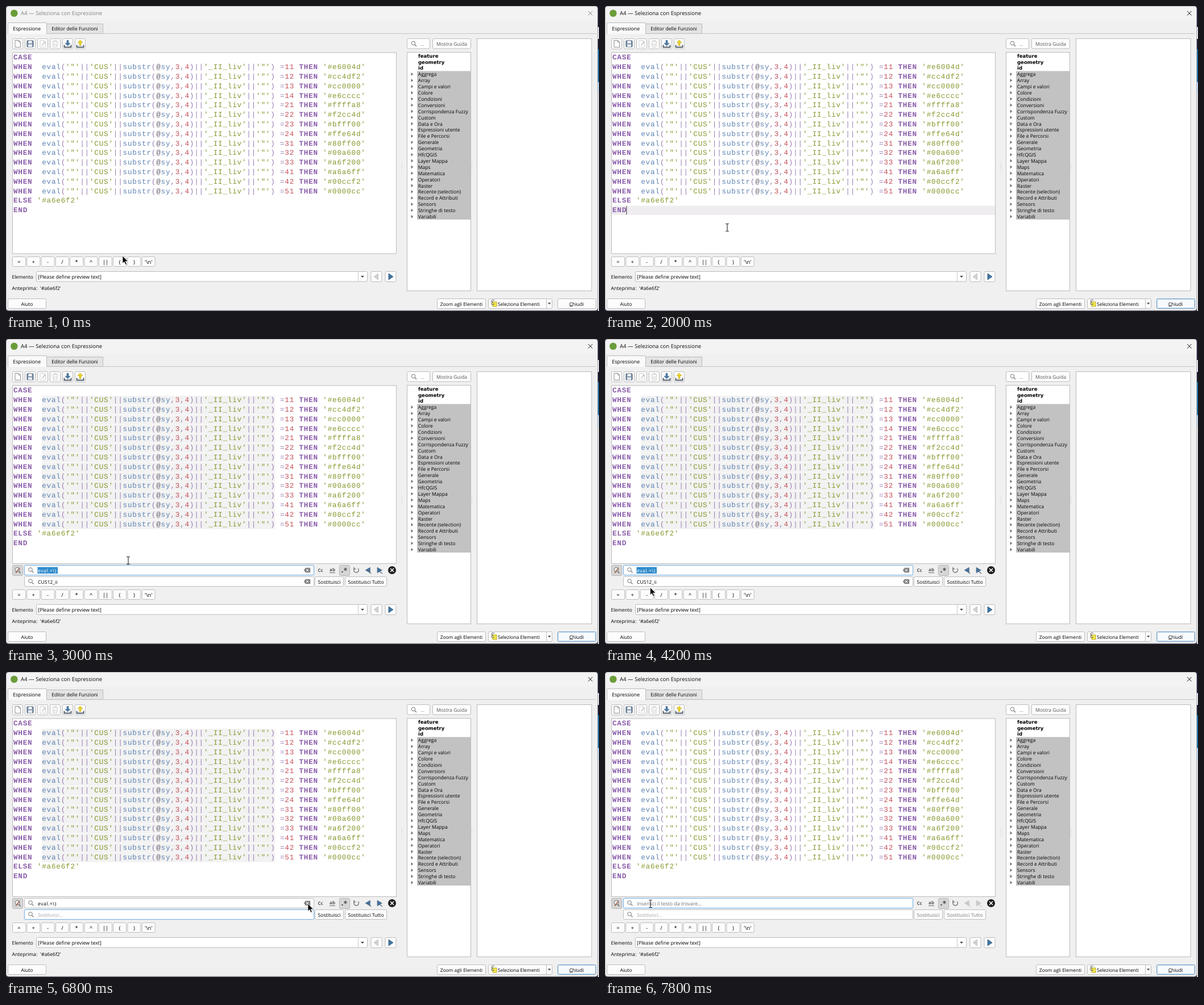
An HTML page for the animation above (8000 ms loop, 1043 by 537 pixels).

```html
<!DOCTYPE html>
<html lang="it">
<head>
<meta charset="utf-8">
<title>Seleziona con Espressione</title>
<style>
html, body { margin: 0; width: 100%; height: 100%; overflow: hidden; background: #f0f0f0; }
svg { display: block; width: 1043px; height: 537px; text-rendering: geometricPrecision; }
text { font: 8.6px "Open Sans", sans-serif; fill: #000; white-space: pre; }
.title { font-size: 9.6px; }
.bold { font: bold 8.55px "DejaVu Sans", sans-serif; }
.code { font: 12.7px "Liberation Mono", monospace; letter-spacing: .76px; }
.kw { fill: #8a5ca9; font-weight: bold; }
.fn { fill: #5f84b4; }
.str { fill: #86992f; }
.num { fill: #c4505a; }
.op { fill: #9a7cb4; }
.at { fill: #6a6470; }
.layer { visibility: hidden; }
</style>
</head>
<body>
<svg id="stage" viewBox="0 0 1043 537" xmlns="http://www.w3.org/2000/svg"></svg>
<script>
const LOOP = 8000;
const LINE = 16.8, COL = 8.38, LEFT = 12.5, BASE = 94.3;

// [start, visible layers]
const STATES = [
  [0, 'idle'],
  [1000, 'active line caret'],
  [1800, 'active line'],
  [2000, 'active line caret'],
  [2200, 'active find marks focus1 picked tail with usable'],
  [3000, 'active find marks focus1 picked with usable'],
  [3200, 'active find marks focus1 picked tail with usable'],
  [3600, 'active find marks focus1 picked with usable'],
  [4800, 'active find marks focus1 picked tail with usable'],
  [5400, 'active find marks focus1 picked with usable'],
  [5800, 'active find marks focus1 picked tail with usable'],
  [6400, 'active find marks query focus2 hint2 usable'],
  [7000, 'active find focus1 hint1 hint2 unusable']
];

// [start, x, y, pointer]
const MOVES = [
  [0, 205, 440, 'arrow'], [200, 207, 425, 'beam'], [400, 211, 408, 'beam'],
  [600, 215, 396, 'beam'], [800, 215, 390, 'beam'],
  [3600, 190, 404, 'beam'], [3800, 150, 424, 'beam'], [4000, 105, 438, 'arrow'],
  [4200, 79.5, 437.5, 'arrow'],
  [4800, 83, 426, 'beam'], [5000, 112, 412, 'beam'], [5200, 200, 410, 'beam'],
  [5400, 330, 416, 'beam'], [5600, 455, 423, 'beam'], [5800, 522, 427, 'beam'],
  [6000, 529, 427, 'arrow'], [6200, 531, 427, 'arrow'],
  [6600, 531, 418, 'arrow'], [6800, 531, 408, 'arrow'],
  [7200, 470, 411, 'beam'], [7400, 300, 409, 'beam'], [7600, 130, 408, 'beam'],
  [7800, 80, 408, 'beam']
];

const rect = (x, y, w, h, fill, stroke = 'none', r = 0) =>
  `<rect x="${x}" y="${y}" width="${w}" height="${h}" fill="${fill}" stroke="${stroke}" rx="${r}"/>`;
const path = (d, stroke, width = 1, fill = 'none') =>
  `<path d="${d}" stroke="${stroke}" stroke-width="${width}" fill="${fill}"/>`;
const text = (x, cy, s, attrs = '') => `<text x="${x}" y="${cy + 3.1}" ${attrs}>${s}</text>`;
const layer = (name, body) => `<g class="layer" data-name="${name}">${body}</g>`;
const at = (x, y, body) => `<g transform="translate(${x} ${y})">${body}</g>`;
const button = (x, y, w, h, label = '', attrs = '', cx = x + w / 2) =>
  rect(x, y, w, h, '#fcfcfc', '#bdbdbd', 2) +
  (label && text(cx, y + h / 2 + .4, label, `text-anchor="middle" ${attrs}`));
const lens = (x, y) =>
  `<circle cx="${x - 1}" cy="${y - 1}" r="3.3" fill="none" stroke="#777"/>` +
  path(`M${x + 1.5} ${y + 1.5}l3 3`, '#777', 1.3);

function desktop() {
  return rect(0, 0, 1043, 537, '#20223a') +
    rect(1041, 37, 2, 21, '#d8dce6') + rect(1041, 76, 2, 58, '#2372a8') +
    rect(1041, 134, 2, 20, '#b9d0ea') + rect(1041, 154, 2, 383, '#d5d6da') +
    rect(.5, .5, 1040, 535.5, '#f0f0f0', '#b9b9bd', 4) +
    rect(1, 1, 1039, 25, '#f3f3f4', 'none', 4);
}

function titleBar() {
  const head = color =>
    text(26, 13, 'A4 — Seleziona con Espressione', `class="title" style="fill:${color}"`) +
    path('M1024 9l7.5 7.5M1031.5 9l-7.5 7.5', color);
  const close = text(1003.5, 524.4, 'Chiudi', 'text-anchor="middle"') + path('M991 528.5h6', '#111', .7);
  return '<circle cx="14.3" cy="12.7" r="6.3" fill="#6a9d38"/>' +
    button(970.5, 515.5, 67, 17) +
    layer('idle', head('#858585')) +
    layer('active', head('#111') + rect(970.5, 515.5, 67, 17, '#f7fafd', '#6f9dc6', 2) +
      rect(971.5, 516.5, 65, 15, 'none', '#c3dbf0', 1)) + close;
}

function tabs() {
  return path('M3 48.5H1037.5', '#c6c6c6') +
    rect(71.5, 31.5, 99, 17, '#e4e4e4', '#bcbcbc') +
    path('M3.5 49V31Q3.5 29.5 5 29.5H70Q71.5 29.5 71.5 31V49', '#bcbcbc', 1, '#fafafa') +
    text(12.3, 39.6, 'Espressione', 'style="font-size:8.75px"') +
    text(80.3, 40.2, 'Editor delle Funzioni');
}

function toolbar() {
  const page = c => path('M-4.5 -6H2L5 -3V6H-4.5ZM2 -6V-3H5', c, 1, '#fff');
  const tray = c => path('M-6 2V6H6V2', '#4c5966', 1.8) + c;
  const icons = [
    page('#8d8d8d'),
    rect(-5.5, -5.5, 11, 11, '#8196ae', '#42566d', 1) + rect(-3, -5, 6, 4, '#fff') + rect(-3.5, 1, 7, 4.5, '#e5ebf1'),
    page('#d2d2d2') + path('M-1 3L5 -4', '#c4c4c4', 1.6),
    path('M-5 -4H5M-2 -4V-6H2V-4M-4 -3L-3.4 6H3.4L4 -3M-1.5 -1V4M1.5 -1V4', '#cdcdcd'),
    tray(path('M-1.5 -6H1.5V-1H4.5L0 3.5L-4.5 -1H-1.5Z', '#385f84', .6, '#4b7ba8')),
    tray(path('M-1.5 3H1.5V-2H4.5L0 -6.5L-4.5 -2H-1.5Z', '#b59b11', .6, '#ecd526'))
  ];
  return icons.map((icon, i) =>
    button(11.5 + 22 * i, 57.5, 18, 18) + at(20.5 + 22 * i, 66.5, icon)).join('');
}

function paint(line) {
  const parts = /('[^']*')|(WHEN|THEN|CASE|ELSE|END)|([a-z]+)|(\d+)|(@)|([^'\w@]+)/g;
  const kinds = ['str', 'kw', 'fn', 'num', 'at', 'op'];
  return line.replace(parts, (all, ...groups) =>
    `<tspan class="${kinds[groups.slice(0, kinds.length).findIndex(Boolean)]}">${all}</tspan>`);
}

function editor() {
  const rules = `11 e6004d,12 cc4df2,13 cc0000,14 e6cccc,21 ffffa8,22 f2cc4d,23 bfff00,
24 ffe64d,31 80ff00,32 00a600,33 a6f200,41 a6a6ff,42 00ccf2,51 0000cc`.split(/,\s*/);
  const lines = ['CASE', ...rules.map(rule => {
    const [code, color] = rule.split(' ');
    return `WHEN  eval('"'||'CUS'||substr(@sy,3,4)||'_II_liv'||'"') =${code} THEN '#${color}'`;
  }), "ELSE '#a6e6f2'", 'END'];
  const top = i => BASE - 11.4 + LINE * i;
  const marks = rules.map((_, i) =>
    rect(LEFT + 6 * COL, top(i + 1) + .4, 49 * COL, LINE - .6, '#f2f2f2', 'none', 1)).join('');
  return rect(11.5, 82, 675, 354, '#fff', '#bbb') +
    layer('line', rect(12, top(16), 674, LINE - .6, '#efedf0')) +
    layer('marks', marks) +
    lines.map((s, i) => `<text class="code" x="${LEFT + .4}" y="${BASE + LINE * i}">${paint(s)}</text>`).join('') +
    layer('caret', path(`M37.8 ${top(16) + .5}v${LINE - 1.6}`, '#333'));
}

function field(y, focus) {
  return rect(32.5, y, 509, 17, '#fff', '#bdbdbd', 2) +
    layer(focus, rect(32.5, y, 509, 17, '#fff', '#6fa9dd', 2) + rect(31.7, y - .8, 510.6, 18.6, 'none', '#cfe3f5', 2)) +
    lens(44, y + 8.5);
}

function findBar() {
  const erase = y => path(`M524 ${y}l3 -4h8v8h-8z`, '#858585', .5, '#858585') +
    path(`M528 ${y - 2}l4 4m0 -4l-4 4`, '#fff', 1);
  const query = attrs => text(56, 407.4, 'eval.+\\)', `style="letter-spacing:.5px;${attrs}"`);
  const replaceButtons = attrs =>
    button(543.5, 418.5, 50, 17, 'Sostituisci', attrs) + button(596.5, 418.5, 73, 17, 'Sostituisci Tutto', attrs);
  const steps = (fill, edge) =>
    path('M640.5 402V412L632 407Z', edge, .5, fill) + path('M653 402V412L661.5 407Z', edge, .5, fill) +
    path('M638 409l4 4M657 409l5 4', edge, 1.2);
  const tools =
    rect(11.5, 398.5, 18, 18, '#d6d6d6', '#b5b5b5', 2) +
    '<circle cx="20" cy="406" r="4" fill="#eee" stroke="#777"/>' + path('M17 412L24 403', '#a4604c', 1.6) +
    path('M22.5 409l3 3.5', '#666', 1.4) +
    text(553, 406.5, 'Cc', 'text-anchor="middle" style="font-weight:bold;font-size:8px;fill:#555"') +
    text(574, 406.3, 'ab', 'text-anchor="middle" style="font-weight:bold;font-size:8px;fill:#555"') +
    path('M569 411.5h10', '#666') +
    rect(586.5, 398.5, 18, 18, '#d6d6d6', '#b5b5b5', 2) +
    rect(590.5, 409, 2, 2, '#333') + path('M597 402.5v6M594.4 404l5.2 3M599.6 404l-5.2 3', '#333') +
    path('M613.3 403.5A4.3 4.3 0 1 0 619.2 403.8', '#666', 1.2) + path('M612 401.5v3.5h3.5', '#666', 1.1) +
    '<circle cx="679" cy="407" r="7" fill="#1d1d1d"/>' + path('M676 404l6 6m0 -6l-6 6', '#fff', 1.6);
  return layer('find', rect(10, 396, 679, 42, '#f0f0f0') + path('M11 395.5H687', '#bbb') + tools +
      field(398.5, 'focus1') + field(418.5, 'focus2')) +
    layer('picked', rect(55.5, 401.5, 35.5, 11.5, '#318ccb') + query('fill:#fff') + erase(407)) +
    layer('tail', path('M91.2 401.5v11.5', '#111')) +
    layer('query', query('') + erase(407)) +
    layer('with', text(56, 427.7, 'CUS12_ii') + erase(427)) +
    layer('hint1', text(56, 407.6, 'Inserisci il testo da trovare...', 'style="fill:#707070;font-size:8.8px"')) +
    layer('hint2', text(56, 427.6, 'Sostituisci...', 'style="fill:#a5a5a5;font-style:italic"')) +
    layer('usable', replaceButtons('') + steps('#447099', '#54687c')) +
    layer('unusable', replaceButtons('style="fill:#777"') + steps('#c9c9c9', '#c6c6c6'));
}

function lower() {
  const ops = ['=', '+', '-', '/', '*', '^', '||', '(', ')', "'\\n'"];
  return ops.map((s, i) => button(11.5 + 25.3 * i, 441.5, 23, 17, s, 'style="font-size:9.4px"')).join('') +
    text(10.6, 476.7, 'Elemento', 'style="font-size:8.4px"') +
    rect(53.5, 467.5, 582, 17.5, '#fff', '#bbb', 2) + path('M619.5 468V485', '#c8c8c8') +
    path('M624 475h6l-3 3.3z', 'none', 0, '#444') +
    text(56, 476.5, '[Please define preview text]', 'style="font-size:8.75px"') +
    button(642, 467.5, 19, 18) + path('M654.5 471V482L647 476.5Z', '#bbb', .7, '#d0d0d0') +
    button(667, 467.5, 19, 18) + path('M673 471V482L681 476.5Z', '#254d70', .7, '#3f76a3') +
    text(10.6, 497, 'Anteprima:') + text(60, 497, "'#a6e6f2'") +
    button(3.5, 515.5, 67, 17, 'Aiuto') +
    button(758.5, 515.5, 85, 17, 'Zoom agli Elementi', 'style="font-size:8.35px"') +
    button(848.5, 515.5, 112, 17, 'Seleziona Elementi', 'style="font-size:8.45px"', 902) +
    path('M950.5 516V532', '#bdbdbd') + path('M953 522.5h5.4l-2.7 3z', 'none', 0, '#444') +
    rect(856, 521, 7, 8, '#f3e74a', '#b9a92a') +
    path('M859 518Q853.5 516.5 854 520Q855 521.5 857 521Q852.5 521.5 854 525Q856.5 526.5 859 524.5', '#555', 1);
}

function sidebar() {
  const names = `Aggrega,Array,Campi e valori,Colore,Condizioni,Conversioni,Corrispondenza Fuzzy,Custom,Data e Ora,
Espressioni utente,File e Percorsi,Generale,Geometria,HfcQGIS,Layer Mappa,Maps,Matematica,Operatori,Raster,
Recente (selection),Record e Attributi,Sensors,Stringhe di testo,Variabili`.split(/,\s*/);
  const rowY = i => 87.5 + 10.9 * i;
  const dots = x => [0, 4, 8, 12].map(d => rect(x, 276 + d, 1, 1, '#b5b5b5')).join('');
  return rect(705.5, 57.5, 40, 17.5, '#fff', '#bdbdbd', 2) + lens(717.5, 66.5) + text(729, 67, '...', 'style="fill:#777"') +
    button(750.5, 57.5, 67, 17.5, 'Mostra Guida', 'style="fill:#555"') +
    rect(705.5, 81.5, 112, 420, '#fff', '#bbb') + rect(723, 114.5, 94, 261.5, '#c2c2c2') +
    ['feature', 'geometry', 'id'].map((s, i) => text(725, rowY(i), s, 'class="bold"')).join('') +
    names.map((s, i) => text(724.8, rowY(i + 3), s) +
      path(`M712.5 ${rowY(i + 3) - 3.2}v6l3.8 -3z`, 'none', 0, '#777')).join('') +
    rect(828.5, 57.5, 201.5, 444, '#fff', '#bbb') + dots(696) + dots(819);
}

function pointers() {
  return layer('arrow', path('M0 0V13.2L3 10.4L5.2 15.4L7.3 14.5L5.1 9.6H9.3Z', '#fff', .7, '#000')) +
    layer('beam', path('M-2.8 -6.5H-.8L0 -6L.8 -6.5H2.8M0 -6V6M-2.8 6.5H-.8L0 6L.8 6.5H2.8', '#222', 1.1));
}

const stage = document.getElementById('stage');
stage.innerHTML = desktop() + titleBar() + tabs() + toolbar() + editor() + findBar() + lower() + sidebar() +
  `<g id="pointer">${pointers()}</g>`;

const pointer = document.getElementById('pointer');
const layers = [...stage.querySelectorAll('.layer')];
const current = (table, t) => table.filter(row => row[0] <= t).pop();

function draw() {
  const t = performance.now() % LOOP;
  const [, x, y, kind] = current(MOVES, t);
  const shown = new Set([...current(STATES, t)[1].split(' '), kind]);
  // Nested focus rings only show while the find bar does.
  for (const el of layers) el.style.visibility = shown.has(el.dataset.name) ? 'visible' : 'hidden';
  pointer.setAttribute('transform', `translate(${x} ${y})`);
  requestAnimationFrame(draw);
}
draw();
</script>
</body>
</html>
```
